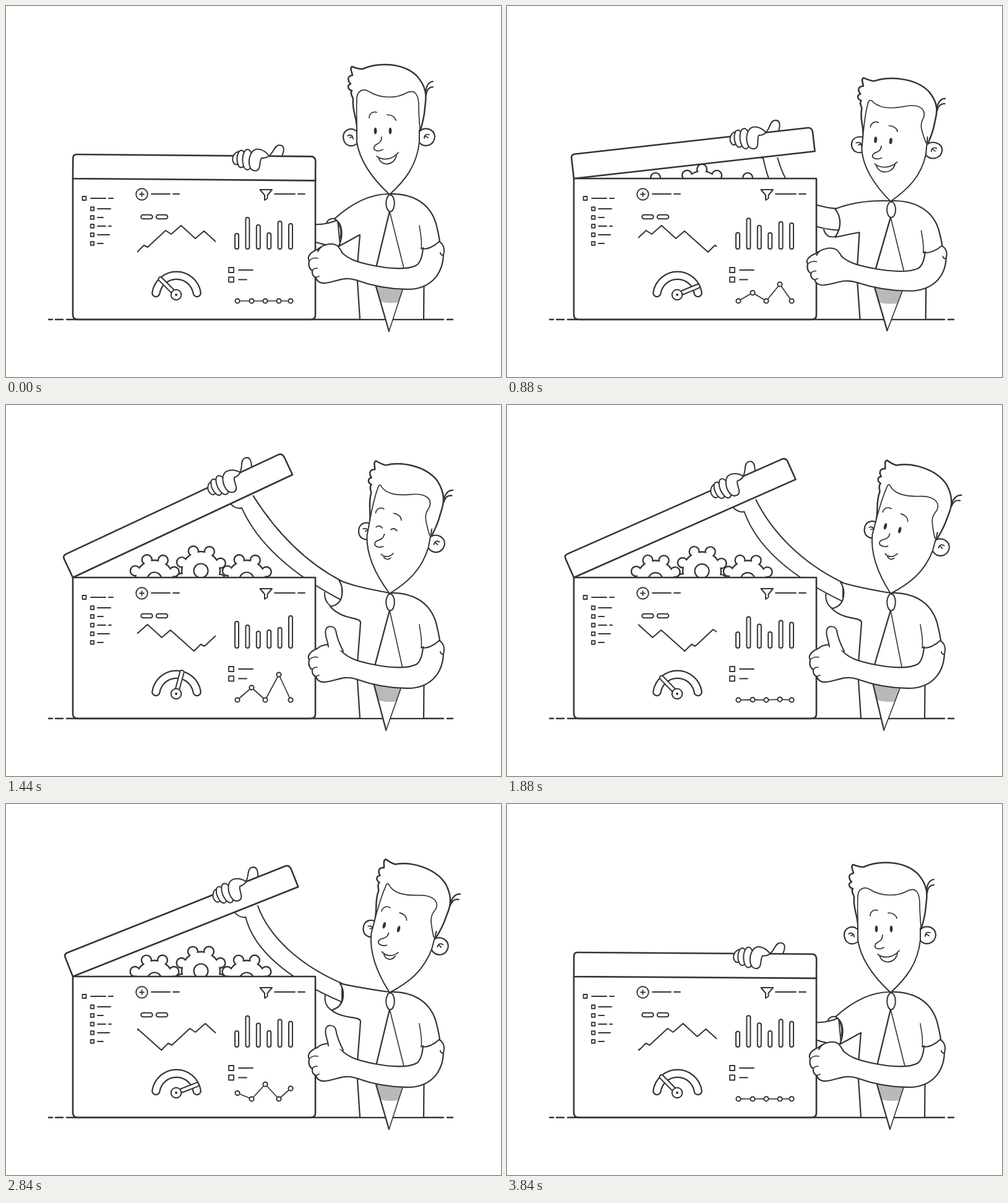
Recreate the animation shown at these times as an HTML page with a canvas. Size 800x600 px, loop 3880 ms.

```html
<!DOCTYPE html>
<html lang="en">
<head>
<meta charset="utf-8">
<title>Dashboard box</title>
<style>
html, body { margin: 0; width: 100%; height: 100%; overflow: hidden; background: #fff; }
canvas { display: block; }
</style>
</head>
<body>
<canvas id="stage" width="800" height="600"></canvas>
<script>
const ctx = document.getElementById('stage').getContext('2d');
const LOOP = 3880, INK = '#343434', DEG = Math.PI / 180;
const NUMBER = /-?[\d.]+/g;

// Smooth monotone interpolation of numbers or of paths with equal structure.
function track(...keys) {
  const times = keys.map(k => k[0]);
  const rows = keys.map(k => String(k[1]).match(NUMBER).map(Number));
  const last = keys.length - 1;
  const slope = (i, c) => (rows[i + 1][c] - rows[i][c]) / (times[i + 1] - times[i]);
  const tangent = (i, c) => {
    if (i === 0 || i === last) return 0;
    const a = slope(i - 1, c), b = slope(i, c);
    return a * b > 0 ? 2 * a * b / (a + b) : 0;
  };
  return t => {
    let i = 0;
    while (i < last - 1 && times[i + 1] <= t) i++;
    const span = times[i + 1] - times[i];
    const u = Math.max(0, Math.min(1, (t - times[i]) / span)), v = 1 - u;
    const values = rows[i].map((p, c) =>
      p * v * v * (1 + 2 * u) + rows[i + 1][c] * u * u * (1 + 2 * v) +
      span * u * v * (v * tangent(i, c) - u * tangent(i + 1, c)));
    if (typeof keys[0][1] === 'number') return values[0];
    let n = 0;
    return keys[0][1].replace(NUMBER, () => values[n++].toFixed(2));
  };
}

const poses = (closed, dip, open, settled, closing) => track(
  [0, closed], [640, closed], [880, dip], [1140, open], [1440, open],
  [2360, settled], [2760, settled], [3360, closing], [3760, closed], [LOOP, closed]);
const blend = (a, b) => track([0, a], [1, b]);

const lidAngle = track([0, -.5], [680, -.5], [880, 6.4], [1120, 25.2], [1220, 27], [1440, 25.1],
  [1720, 24.1], [2360, 23.3], [2840, 21.7], [3140, 20.8], [3360, 18.2], [3560, 9], [3780, 0], [LOOP, -.5]);
const squash = track([0, 1], [560, 1], [880, .945], [1130, 1.005], [1440, 1], [LOOP, 1]);
const headTilt = track([0, 0], [640, 0], [880, 5], [1120, 14.5], [1440, 10.5], [1680, 14.8],
  [2840, 14.7], [3360, 7], [3780, 0], [LOOP, 0]);
const headTurn = track([0, 0], [600, 0], [880, .75], [1120, 1], [2840, 1], [3360, .77], [3780, 0], [LOOP, 0]);
const smile = track([0, 1], [900, 1], [1160, .2], [1400, 0], [2360, 0], [2840, .45], [3360, .95], [3600, 1], [LOOP, 1]);
const eyeOpen = track([0, 1], [1280, 1], [1360, 0], [1540, 0], [1620, 1], [LOOP, 1]);
const tieSwing = track([0, 0], [640, 0], [880, 1.3], [1440, 1.4], [2360, 4.5], [2840, 0], [LOOP, 0]);
const gearDrop = track([0, 45], [700, 45], [880, 30], [1140, -2], [1440, 0], [2360, 1], [2840, 2],
  [3100, 7], [3360, 24], [3640, 45], [LOOP, 45]);
const thumbUp = track([0, 0], [920, 0], [1180, 1], [3380, 1], [3720, 0], [LOOP, 0]);
const forearmLift = track([0, 0], [2900, 0], [3360, 2.7], [3740, 0], [LOOP, 0]);

const arm = poses(
  'C440,330 480,370 536,346 L540,388 C490,390 420,350',
  'C450,290 470,325 538,328 L540,363 C450,360 425,300',
  'C430,195 475,250 543,285 L543,316 C455,270 405,220',
  'C425,215 475,260 543,290 L543,320 C455,282 400,235',
  'C430,240 480,290 543,297 L543,328 C450,318 410,250');
const hem = poses(
  'M519,356 C516,346 525,343 531,344 C540,350 543,365 540,375',
  'M515,353 C518,364 525,367 533,365 C537,362 538,358 538,352',
  'M515,303 C514,318 524,327 532,328 C538,325 541,318 542,314',
  'M516,308 C513,325 524,334 532,334 C538,330 541,324 542,318',
  'M515,326 C515,340 524,346 531,345 C537,342 541,335 542,328');
const shoulder = poses(
  'M531,344 C560,318 590,304 619,304',
  'M533,318 C560,306 590,303 619,304',
  'M538,283 C560,293 590,298 619,304',
  'M540,290 C565,296 590,300 619,304',
  'M532,296 C560,299 590,302 619,304');
const underarm = poses(
  'L572,370 C560,376 548,384 538,388 C545,372 545,352 531,344',
  'L571,358 C558,360 545,364 533,366 C544,350 542,330 533,318',
  'L573,352 C573,342 545,349 524,326 C548,322 546,296 538,283',
  'L573,352 C573,342 545,349 526,333 C549,327 548,302 540,290',
  'L572,354 C571,350 550,352 528,346 C549,336 550,310 532,296');
const thumb = blend(
  'M504,397 C507,390 512,387 518,386 C524,384 530,384 536,388 C538,390 540,394 543,398',
  'M521,391 C520,380 514,372 517,363 C520,356 531,357 533,365 C535,377 538,385 545,398');
const hairline = blend(
  'M567,195 C567,180 566,165 567,150 C567,138 577,132 586,138 C605,150 632,150 648,140 C662,134 667,145 667,162 C667,175 668,185 669,200',
  'M567,195 C567,180 567,160 570,142 C570,136 573,133 575,137 C585,147 600,148 625,141 C645,135 660,140 658,155 C652,168 652,172 666,200');
const mouth = blend(
  'M608,245 C614,249 622,248 627,240 M613,249 C617,252 621,252 624,248',
  'M599,243 C610,251 625,248 634,237 M602,245 C606,260 627,259 631,242');

function line(d, width = 1.8) {
  ctx.lineWidth = width;
  ctx.stroke(new Path2D(d));
}
function shape(d, width = 2.2, fill = '#fff') {
  ctx.fillStyle = fill;
  ctx.fill(new Path2D(d));
  if (width) line(d, width);
}
function oval(x, y, rx, ry, width = 2, fill = '#fff') {
  ctx.beginPath();
  ctx.ellipse(x, y, rx, ry, 0, 0, 7);
  ctx.fillStyle = fill;
  ctx.fill();
  ctx.lineWidth = width;
  if (width) ctx.stroke();
}
// A hollow tube: dark stroke with a white core.
function tube(d, outer, inner) {
  line(d, outer);
  ctx.strokeStyle = '#fff';
  line(d, inner);
  ctx.strokeStyle = INK;
}
function square(x, y, size) {
  ctx.lineWidth = 1.8;
  ctx.strokeRect(x - size / 2, y - size / 2, size, size);
}
function group(draw) {
  ctx.save();
  draw();
  ctx.restore();
}
function turn(x, y, degrees, draw) {
  group(() => {
    ctx.translate(x, y);
    ctx.rotate(degrees * DEG);
    ctx.translate(-x, -y);
    draw();
  });
}

function gear(x, y, rot) {
  const parts = [[0, 0, 31]];
  for (let k = 0; k < 8; k++) {
    const a = (k * 45 + rot) * DEG;
    parts.push([34 * Math.cos(a), 34 * Math.sin(a), 8]);
  }
  for (const [grow, color] of [[1.2, INK], [-1.2, '#fff']])
    for (const [px, py, r] of parts) oval(x + px, y + py, r + grow, r + grow, 0, color);
  oval(x, y, 11.5, 11.5, 2.2);
}

function trend(t) {
  const profile = [[0, 398], [11, 387], [17, 390], [46, 363], [55, 369], [71, 355], [94, 376], [108, 364]];
  group(() => {
    ctx.beginPath();
    ctx.rect(212, 340, 127, 70);
    ctx.clip();
    const points = [];
    for (let n = -1; n < 3; n++)
      for (const [x, y] of profile) points.push([212 + x + 146 * (n - t / LOOP), y]);
    line('M' + points.join('L'), 2);
  });
}

function gauge(t) {
  tube('M242.4,464 A33.5,33.5 0 0 1 308.6,464', 14.5, 10);
  const angle = -45 + 115 * (1 - Math.cos(t / 1940 * 2 * Math.PI)) / 2;
  turn(275, 467, angle, () => tube('M275,467 V431', 8.5, 4.5));
  oval(275, 467, 8.3, 8.3);
  oval(275, 467, 2, 2, 0, INK);
}

function bars(t) {
  const low = [368, 342, 354, 367, 348, 352], high = [350, 356, 366, 364, 360, 341];
  const mix = (1 - Math.cos(t / 970 * 2 * Math.PI)) / 2;
  low.forEach((y, i) => tube(`M${373 + 17.4 * i},${y + (high[i] - y) * mix + 3} V390`, 8, 4));
}

function dots(t) {
  const smooth = u => (u = Math.max(0, Math.min(1, u)), u * u * (3 - 2 * u));
  const phase = t % 1940;
  const rise = smooth(phase / 1450) * (1 - smooth((phase - 1490) / 430));
  const heights = t < 1940 ? [0, 20, 0, 41, 0] : [14, 0, 35, 0, 25];
  const points = [374, 397, 419, 441, 460].map((x, i) => [x, 477 - heights[i] * rise]);
  line('M' + points.join('L'), 1.7);
  for (const [x, y] of points) oval(x, y, 3.6, 3.6);
}

function dashboard(t) {
  shape('M108,279 H500 V500 Q500,507 492,507 H116 Q108,507 108,499 Z', 2.6);
  square(126.5, 311, 6);
  [328, 342, 356, 370, 384].forEach(y => square(139.5, y, 5.5));
  line('M137,311H161M166,311H173M148,328H169M148,342H157M148,356H161M166,356H170M148,370H167M148,384H157');
  oval(219.5, 304.5, 9.3, 9.3, 1.9);
  line('M216,304.5H223M219.5,301V308M235,304H265M270,304H280M434,304H467M472,304H483');
  tube('M221.5,341H233.5M246,341H258', 8.5, 4.5);
  line('M410.5,297H430L422.5,306V311L418,314V306Z', 2);
  square(364, 427, 8);
  square(364, 442.5, 8);
  line('M376,427H399M376,442.5H389');
  trend(t);
  gauge(t);
  bars(t);
  dots(t);
}

function raisedArm(t, angle) {
  const fold = 1 - Math.max(0, Math.min(1, angle / 18));
  const cos = Math.cos(angle * DEG), sin = Math.sin(angle * DEG);
  const onLid = (x, y) => [108 + x * cos + y * sin, 279 - x * sin + y * cos];
  const top = onLid(320 + 17 * fold, 4), low = onLid(295 + 20 * fold, 14 - 19 * fold);
  const bend = onLid(284 + 27 * fold, 12 - 19 * fold), wrist = onLid(280 + 30 * fold, -4);
  shape(`M${top} ${arm(t)} ${low} Q${bend} ${wrist}`, 2);
}

function lid(angle) {
  turn(108, 279, -angle, () => {
    shape('M424,240 C432,236 433,222 441,222 C450,222 450,230 445,241', 2);
    shape('M108,279 V246 Q108,240 114,240 H493 Q499,240 500,247 V279 Z', 2.6);
    shape('M378,233 C368,233 364,244 367,250 C369,256 375,255 379,249', 2);
    oval(380, 245, 7, 14);
    oval(390, 246, 8, 16.5);
    shape('M425,240 C418,230 404,224 397,234 C390,245 391,264 403,264 C413,263 408,249 413,243 C418,244 422,242 425,240', 2);
  });
}

function torso(t) {
  shape(`${shoulder(t)} C655,302 685,318 695,352 C700,372 702,385 702,392 L676,395 L675,507 L572,507 L567,430 ${underarm(t)} Z`);
  line('M668,355 C670,370 673,380 671,393', 1.6);
  turn(620, 332, tieSwing(t), () => {
    shape('M620,332 L594,440 L619,526 L647,440 Z', 0);
    shape('M594,440 L605,478 Q620,482 634,479 L647,440 Z', 0, '#b9b9b9');
    line('M619,526 L647,440 L620,332', 1.6);
    line('M620,332 L594,440 L619,526', 2.3);
  });
}

function forearm(t) {
  turn(700, 400, forearmLift(t), () => {
    shape('M674,391 C673,405 670,414 664,419 C650,427 620,425 595,420 C570,415 548,410 535,389 C525,385 508,388 503,394 C492,398 486,406 490,412 C488,420 491,426 495,428 C494,434 497,438 501,439 C502,446 510,449 516,448 C535,446 545,437 565,443 C590,452 620,459 655,458 C690,455 708,430 707,396');
    line('M490,412 Q496,406 504,408 M495,428 Q497,424 503,424 M501,439 L506,437', 1.7);
    shape(thumb(thumbUp(t)), 2);
  });
  shape('M672,392 C680,395 693,388 700,381 C706,384 710,392 707,402 C705,404 702,402 702,399', 2);
}

function head(t) {
  const side = headTurn(t);
  turn(620, 305, headTilt(t), () => {
    group(() => {
      ctx.translate(7 * side, 0);
      shape('M567,203 C558,195 545,200 545,212 C546,226 558,230 568,222');
      line('M552,210 Q560,206 561,215 M556,213 L560,211');
    });
    shape('M668,203 C677,194 692,199 693,211 C692,226 677,230 668,221');
    line('M684,208 Q676,206 676,214 M677,210 L682,213');
    shape('M567,195 C566,178 559,168 561,150 C559,145 556,140 559,137 C552,135 551,128 557,126 C551,120 552,113 560,112 C559,106 555,101 559,98 C565,100 570,102 576,102 C600,91 640,91 663,112 C684,135 678,152 677,165 C676,180 673,190 670,200', 2.5);
    line('M678,140 C679,130 682,123 690,122 M679,144 C680,135 684,131 690,131', 2.2);
    shape('M567,185 V220 C572,252 595,282 620,305 C645,282 664,258 668,220 V190', 2);
    shape(hairline(side), 1.7);
    group(() => {
      ctx.translate(-13 * side, 0);
      line('M587,181 C587,173 594,170 599,172 M616,176 C624,176 629,180 630,185', 1.7);
      const open = eyeOpen(t);
      if (open > .2) for (const x of [597, 621]) oval(x, 202, 2.4, 5.4 * open, 0, INK);
      else line('M592,203 Q597,198 602,203 M616,203 Q621,198 626,203');
      line('M607,212 C607,222 600,222 596,226 C591,233 600,237 609,232');
      line(mouth(smile(t)));
    });
  });
}

function draw(t) {
  ctx.fillStyle = '#fff';
  ctx.fillRect(0, 0, 800, 600);
  ctx.strokeStyle = INK;
  ctx.lineCap = ctx.lineJoin = 'round';
  const angle = lidAngle(t), drop = gearDrop(t), rot = (30 - drop) * .8;
  const body = draw => group(() => {
    const s = squash(t);
    ctx.translate(620, 507);
    ctx.scale(1 + (1 - s) * .55, s);
    ctx.translate(-620, -507);
    draw();
  });

  gear(240, 282 + drop, rot);
  gear(389, 282 + drop, rot);
  gear(315, 268 + drop, rot);
  body(() => shape(hem(t), 2));
  raisedArm(t, angle);
  dashboard(t);
  lid(angle);
  line('M69,507H75M80,507H92M98,507H707M713,507H722', 2.4);
  body(() => {
    torso(t);
    head(t);
    oval(621, 319, 6.8, 13.5);
    forearm(t);
  });
}

function frame() {
  draw(performance.now() % LOOP);
  requestAnimationFrame(frame);
}
frame();
</script>
</body>
</html>
```
